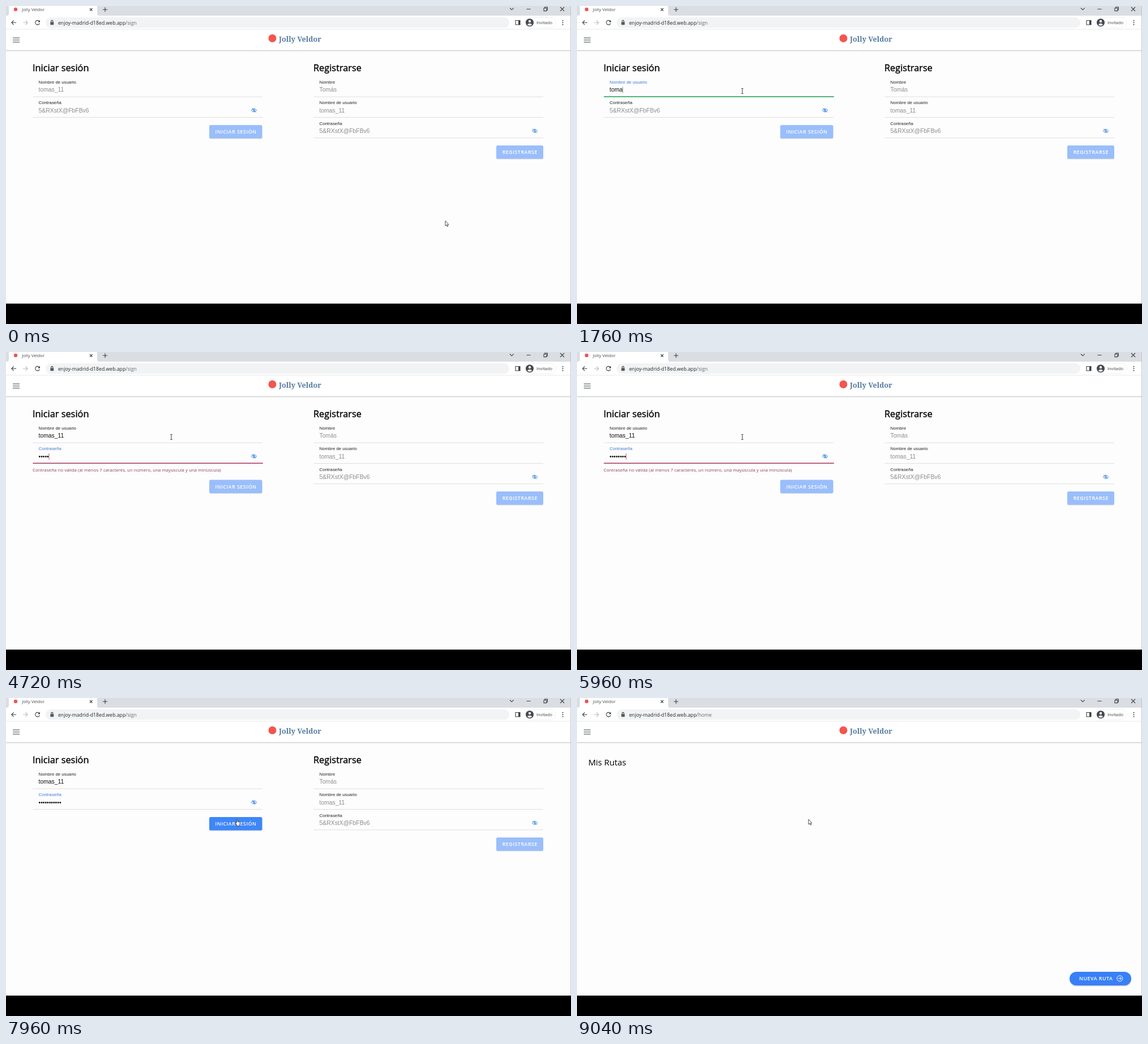
Animation, 998 px wide and 561 px high, one loop 9.08 s. Source, as an HTML page:

```html
<!DOCTYPE html>
<html lang="es">
<head>
<meta charset="utf-8">
<title>Iniciar sesión</title>
<style>
html, body { margin: 0; width: 100%; height: 100%; overflow: hidden; background: #000; }
svg { display: block; width: 998px; height: 561px; }
text { white-space: pre; }
.ui { font-family: "Open Sans", "Noto Sans", sans-serif; }
.form { font-family: "Liberation Sans", Arial, sans-serif; }
.brand { font: 700 12.7px "Noto Serif", serif; fill: #557b9f; }
.head { font-size: 16.35px; stroke: #000; stroke-width: .35px; }
.label { font-size: 7.8px; fill: #222; }
.value { font-size: 10.4px; }
.btn { font-size: 8.8px; font-weight: 600; letter-spacing: .55px; fill: #fff; }
.line { fill: none; stroke: #3c4043; stroke-width: 1.1; }
</style>
</head>
<body>
<svg id="stage" viewBox="0 0 998 561" xmlns="http://www.w3.org/2000/svg"></svg>
<script>
const LOOP = 9080;
const BLUE = [62, 121, 214], DARK = [34, 34, 34];
const RED = '#a3355c', GREEN = '#30a75c', HINT = '#8d8d8d';
const USER = 'tomas_11', PASS = '5&amp;RXstX@FbFBv6';

// Moments of the story, in ms
const userKeys = [1120, 1340, 1520, 1700, 1900, 2260, 2540, 2700];
const passKeys = [3760, 4000, 4240, 4480, 4680, 5080, 5480, 5840, 6120, 6340, 6600];
const focusUser = 680, focusPass = 3220, blurPass = 7920;
const validAt = passKeys[10], homeAt = 8500;

const text = (x, y, s, cls, extra = '') => `<text x="${x}" y="${y}" class="${cls}" ${extra}>${s}</text>`;
const rect = (x, y, w, h, fill, extra = '') =>
  `<rect x="${x}" y="${y}" width="${w}" height="${h}" fill="${fill}" ${extra}/>`;
const path = (d, extra = '') => `<path d="${d}" class="line" ${extra}/>`;

const eye = (x, y) => `<g transform="translate(${x} ${y})" fill="none" stroke="#4189e0" stroke-width="1">
  <path d="M-4.8 0Q0-6 4.8 0Q0 6-4.8 0Z"/><circle r="1.5"/><path d="M-3.7-3.5L3.7 3.5"/></g>`;

const field = (x, y, label, hint, id = '') =>
  text(x + 10, y - 23, label, 'form label', id && `id="${id}Label"`) +
  text(x + 10, y - 8.8, hint, 'form value', `fill="${HINT}" ${id && `id="${id}Value"`}`) +
  rect(x, y - .3, 405.5, .8, '#d8d8d8', id && `id="${id}Rule"`) +
  (id ? rect(x, y - .8, 406.5, 1.4, GREEN, `id="${id}Bar"`) +
        rect(x, y - 17.5, .8, 11, GREEN, `id="${id}Caret"`) : '');

const button = (x, y, w, label, fill, id) =>
  `<g id="${id}">${rect(x, y + .9, w, 23.5, '#000', 'rx="2.6" opacity=".13"')}
  ${rect(x, y, w, 23.5, fill, 'rx="2.6" class="face"')}
  ${text(x + w / 2 + .3, y + 15, label, 'ui btn', 'text-anchor="middle"')}</g>`;

const header = rect(0, 78, 998, 2.2, '#000', 'opacity=".07"') + rect(0, 41, 998, 37, '#fff') +
  rect(0, 77.8, 998, 1, '#cfcfcf') +
  path('M12 56.2H24M12 60H24M12 63.8H24', 'stroke-width="1.3"') +
  '<circle cx="470.5" cy="57" r="7" fill="#f5554d"/>' + text(482, 63, 'Jolly Veldor', 'brand');

const chrome = rect(0, 0, 998, 41, '#fff') + rect(0, 0, 998, 17, '#dadde2') +
  '<path d="M2 17Q5 17 5 13V0H161V13Q161 17 164 17Z" fill="#fff"/>' +
  '<circle cx="17" cy="6" r="3.2" fill="#ee5550"/>' +
  text(28, 9, 'Jolly Veldor', 'ui', 'font-size="7.8" fill="#45484c"') +
  path('M148 4L152.6 8.6M152.6 4L148 8.6M171 6.3H179M175 2.3V10.3') +
  path('M890 3.5L893.3 6.8L896.6 3.5M919.5 5.5H926.5M950 3.8H954.8V8.6H950ZM951.6 3.6V2H956.4V7H955M979 2L986 9M986 2L979 9', 'stroke-width="1"') +
  path('M18 29.3H10M13.6 25.5L9.8 29.3L13.6 33.1') +
  path('M30 29.3H38M34.4 25.5L38.2 29.3L34.4 33.1', 'style="stroke:#b9bcc0"') +
  path('M58.8 27A3.9 3.9 0 1 0 59.3 30.5') + '<path d="M60 24.8V28.6H56.2Z" fill="#3c4043"/>' +
  rect(70, 20, 819, 18.6, '#f1f3f4', 'rx="9.3"') +
  rect(78.3, 28.2, 6, 5, '#55585c', 'rx=".7"') + path('M79.7 28.5V27A1.6 1.6 0 0 1 82.9 27V28.5', 'stroke-width=".9"') +
  '<text x="92" y="32.6" class="ui" font-size="8.7" fill="#26282b">enjoy-madrid-d18ed.web.app<tspan id="route" fill="#696d72">/sign</tspan></text>' +
  path('M900 25.5H908V33H900Z') + rect(905, 25.5, 3, 7.5, '#3c4043') +
  rect(916, 20.3, 55, 18, '#fff', 'rx="9" stroke="#eceef0" stroke-width=".8"') +
  '<circle cx="925" cy="29.2" r="7" fill="#454950"/><circle cx="925" cy="27" r="2.2" fill="#fff"/><path d="M920.8 33Q925 28.5 929.2 33Q925 36.5 920.8 33Z" fill="#fff"/>' +
  text(937, 32, 'Invitado', 'ui', 'font-size="7.4" fill="#3c4043"') +
  [25.7, 29.2, 32.7].map(y => `<circle cx="983.5" cy="${y}" r="1" fill="#3c4043"/>`).join('') +
  rect(0, 40.6, 998, .8, '#e3e3e6');

const sign = rect(0, 41, 998, 484, '#fdfdfd') + header +
  text(47, 115, 'Iniciar sesión', 'ui head') + text(543, 115, 'Registrarse', 'ui head') +
  field(47.5, 160, 'Nombre de usuario', USER, 'user') +
  field(47.5, 196.3, 'Contraseña', PASS, 'pass') + eye(438, 184) +
  text(47, 210.5, 'Contraseña no válida (al menos 7 caracteres, un número, una mayúscula y una minúscula)',
    'ui', 'id="error" font-size="7.8" letter-spacing=".07" fill="#8f3a55"') +
  button(359, 210, 93.5, 'INICIAR SESIÓN', '#9abefb', 'login') +
  field(543.5, 160, 'Nombre', 'Tomás') +
  field(543.5, 196.3, 'Nombre de usuario', USER) +
  field(543.5, 232.6, 'Contraseña', PASS) + eye(934, 220.3) +
  button(866, 246, 83, 'REGISTRARSE', '#9abefb', 'join');

const home = rect(0, 41, 998, 510, '#fdfdfd') + header +
  text(20, 119.3, 'Mis Rutas', 'ui', 'font-size="14.8"') +
  rect(870, 484.6, 109, 24, '#000', 'rx="12" opacity=".2"') +
  rect(870, 483, 109, 24, '#3880f7', 'rx="12"') +
  text(887, 498.2, 'NUEVA RUTA', 'ui btn') +
  '<g fill="none" stroke="#fff"><circle cx="958.8" cy="494.8" r="5"/><path d="M956 494.8H961.4M959.2 492.4L961.6 494.8L959.2 497.2"/></g>';

const cursors = `<path id="arrow" d="M0 0V9L2.1 7.2L3.5 10.2L4.8 9.6L3.5 6.7H6Z" fill="#fff" stroke="#222" stroke-width=".8"/>
  <path id="beam" d="M-1.8-4.5H-.5L0-4L.5-4.5H1.8M0-4V4M-1.8 4.5H-.5L0 4L.5 4.5H1.8" fill="none" stroke="#222" stroke-width=".9"/>
  <path id="hand" d="M-1.6-5.5Q-.7-6.4 .1-5.5V-2L3.7-1.2Q4.5-.9 4.4 0L3.7 4.3Q3.4 5.8 2 5.8H-.8L-4-.1Q-3.7-1.3-2.5-.6L-1.6 .5Z" fill="#fff" stroke="#222" stroke-width=".8"/>`;

document.getElementById('stage').innerHTML =
  `<g id="sign">${sign}</g><g id="home">${home}</g>${chrome}` +
  rect(997.2, 0, .8, 525, '#b9bcc0') + rect(0, 525, 998, 36, '#000') + cursors;

const $ = id => document.getElementById(id);
const set = (id, attrs) => { for (const k in attrs) $(id).setAttribute(k, attrs[k]); };
const show = (id, on) => set(id, { visibility: on ? 'visible' : 'hidden' });
const ramp = (t, from, to) => Math.min(1, Math.max(0, (t - from) / (to - from)));
const ease = p => p * p * (3 - 2 * p);
const mix = (a, b, p) => `rgb(${a.map((v, i) => Math.round(v + (b[i] - v) * p))})`;
const measure = document.createElement('canvas').getContext('2d');
measure.font = '10.4px "Liberation Sans", Arial, sans-serif';

function drawField(id, t, o) {
  const count = o.keys.filter(k => k <= t).length;
  const focused = t >= o.on && t < o.off;
  const typed = o.show(count);
  const color = t >= o.valid ? GREEN : RED;
  const last = Math.max(o.on, ...o.keys.slice(0, count));
  const half = 203.25 * ease(ramp(t, o.on, o.on + 170));
  $(id + 'Value').textContent = count ? typed : o.hint;
  set(id + 'Value', { fill: count ? '#111' : HINT });
  set(id + 'Label', { style: 'fill:' + mix(DARK, BLUE, ramp(t, o.on, o.on + 150) - ramp(t, o.off + o.lag, o.off + o.lag + 130)) });
  set(id + 'Rule', { fill: focused ? color : '#d8d8d8' });
  set(id + 'Bar', { x: 250.75 - half, width: half * 2, fill: color });
  show(id + 'Bar', focused);
  set(id + 'Caret', { x: 57.4 + measure.measureText(typed).width, fill: color });
  show(id + 'Caret', focused && (t - last) % 1000 < 500);
}

function drawCursor(t) {
  const a = ease(ramp(t, 80, 520)), b = ease(ramp(t, 6800, 7440));
  const x = 776 - 484 * a + 117 * b, y = 379 - 229 * a + 70 * b;
  const onButton = x > 359 && x < 453 && y > 210 && y < 234 && t < homeAt + 100;
  const onField = x > 48 && x < 454 && y > 125 && y < 190 && t < homeAt;
  const kind = onButton ? 'hand' : onField ? 'beam' : 'arrow';
  const dy = kind === 'arrow' && t > homeAt ? -6 : 0;
  for (const id of ['arrow', 'beam', 'hand']) show(id, id === kind);
  set(kind, { transform: `translate(${x} ${y + dy})` });
}

function render(t) {
  drawField('user', t, { keys: userKeys, on: focusUser, off: focusPass, lag: 0, valid: userKeys[0],
    hint: USER, show: n => USER.slice(0, n) });
  drawField('pass', t, { keys: passKeys, on: focusPass, off: blurPass, lag: 60, valid: validAt,
    hint: '5&RXstX@FbFBv6', show: n => '•'.repeat(n) });
  const wrong = t >= passKeys[0] && t < validAt;
  show('error', wrong);
  set('login', { transform: `translate(0 ${wrong ? 15.5 : 0})` });
  $('login').querySelector('.face').setAttribute('fill', t >= validAt ? '#3f86f8' : '#9abefb');
  const p = ramp(t, homeAt, homeAt + 280), rise = 1 - (1 - p) ** 3;
  show('home', p > 0);
  set('home', { opacity: rise, transform: `translate(0 ${26 * (1 - rise)})` });
  $('route').textContent = t >= homeAt ? '/home' : '/sign';
  drawCursor(t);
}

const start = performance.now();
function tick() {
  render((performance.now() - start) % LOOP);
  requestAnimationFrame(tick);
}
tick();
</script>
</body>
</html>
```
